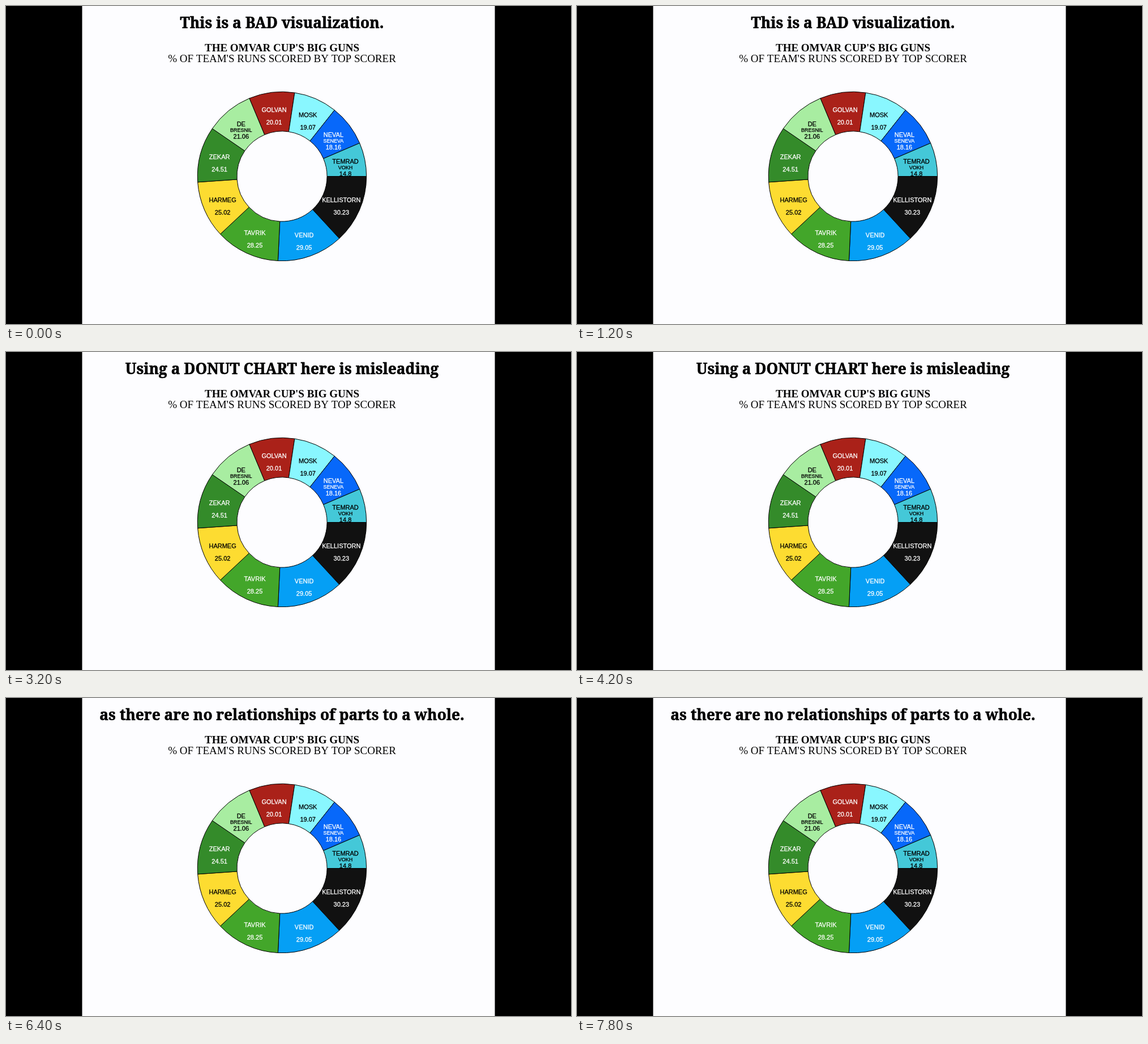
These frames come from a looping animation (998 px wide and 561 px high, 8000 ms). An HTML page with a canvas:

```html
<!DOCTYPE html>
<html lang="en">
<head>
<meta charset="utf-8">
<title>Donut chart</title>
<style>
html, body { margin: 0; width: 100%; height: 100%; overflow: hidden; background: #000; }
canvas { display: block; }
</style>
</head>
<body>
<canvas id="stage" width="998" height="561"></canvas>
<script>
const ctx = document.getElementById('stage').getContext('2d');
const LOOP = 8000;
const CX = 487.5, CY = 300.5, OUTER = 149.2, INNER = 79.6;
const SANS = '"Liberation Sans", Arial, sans-serif';
const SERIF = '"Liberation Serif", Times, serif';
const HEAD = '"Noto Serif", serif';

const titles = [
  [0, 'This is a BAD visualization.'],
  [3000, 'Using a DONUT CHART here is misleading'],
  [6000, 'as there are no relationships of parts to a whole.']
];

// value, slice colour, text colour, name, second name
const slices = [
  [30.23, '#111111', '#fff', 'KELLISTORN'],
  [29.05, '#059ff5', '#fff', 'VENID'],
  [28.25, '#43a62a', '#fff', 'TAVRIK'],
  [25.02, '#fddc31', '#000', 'HARMEG'],
  [24.51, '#348b2a', '#fff', 'ZEKAR'],
  [21.06, '#a8eda1', '#000', 'DE', 'BRESNIL'],
  [20.01, '#aa2119', '#fff', 'GOLVAN'],
  [19.07, '#89f7ff', '#000', 'MOSK'],
  [18.16, '#0768fa', '#fff', 'NEVAL', 'SENEVA'],
  [14.8, '#44c8d8', '#000', 'TEMRAD', 'VOKH']
];
const total = slices.reduce((sum, s) => sum + s[0], 0);

// A thin outline of the same colour thickens the letters by "weight" pixels.
function text(str, x, y, font, color = '#000', weight = 0) {
  ctx.font = font;
  ctx.fillStyle = ctx.strokeStyle = color;
  ctx.fillText(str, x, y);
  if (weight) {
    ctx.lineWidth = weight;
    ctx.strokeText(str, x, y);
  }
}

function drawSlice(from, to, color) {
  ctx.beginPath();
  ctx.arc(CX, CY, OUTER, from, to);
  ctx.arc(CX, CY, INNER, to, from, true);
  ctx.closePath();
  ctx.fillStyle = color;
  ctx.fill();
  ctx.stroke();
}

function drawLabel(mid, [value, , color, name, second]) {
  const r = (OUTER + INNER) / 2;
  const x = CX + r * Math.cos(mid), y = CY + r * Math.sin(mid);
  const line = (str, dy, size) => text(str, x, y + dy, size + 'px ' + SANS, color, 0.3);
  line(name, 0, 11);
  if (second) line(second, 10, 9);
  line(String(value), 22, 11);
}

function drawChart() {
  ctx.strokeStyle = '#000';
  ctx.lineWidth = 1;
  let angle = 0;
  const mids = slices.map(s => {
    const from = angle;
    angle += s[0] / total * Math.PI * 2;
    drawSlice(from, angle, s[1]);
    return (from + angle) / 2;
  });
  slices.forEach((s, i) => drawLabel(mids[i], s));
}

function draw(t) {
  ctx.fillStyle = '#000';
  ctx.fillRect(0, 0, 998, 561);
  ctx.fillStyle = '#fdfdff';
  ctx.fillRect(134.5, 0, 729, 561);
  ctx.textAlign = 'center';
  ctx.textBaseline = 'alphabetic';
  ctx.lineJoin = 'round';
  const title = titles.filter(([start]) => t >= start).pop()[1];
  text(title, CX, 39, 'bold 26.3px ' + HEAD, '#000', 0.6);
  text("THE OMVAR CUP'S BIG GUNS", CX, 80, 'bold 19px ' + SERIF);
  text("% OF TEAM'S RUNS SCORED BY TOP SCORER", CX, 99, '19px ' + SERIF);
  drawChart();
}

const begin = performance.now();
function frame() {
  draw((performance.now() - begin) % LOOP);
  requestAnimationFrame(frame);
}
frame();
</script>
</body>
</html>
```
